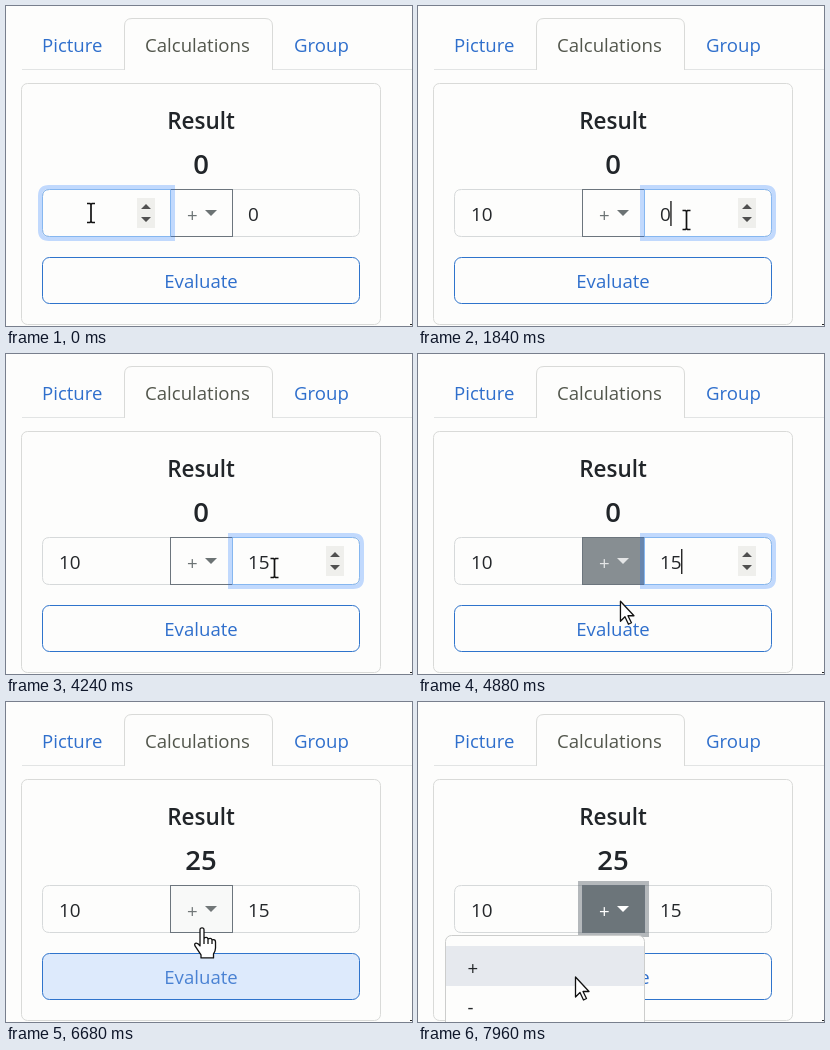
Write an HTML page that moves like this. It is 406 px wide and 320 px high and loops after 8 s.

```html
<!DOCTYPE html>
<html lang="en">
<head>
<meta charset="utf-8">
<title>Calculations form</title>
<style>
html, body { margin: 0; width: 100%; height: 100%; overflow: hidden; background: #fdfdfc; }
svg { display: block; width: 406px; height: 320px; }
text { font: 18.6px "Open Sans", "Noto Sans", sans-serif; fill: #24272a; }
.link { fill: #2f6fcc; }
.head { font-size: 22.5px; font-weight: 600; fill: #212529; text-anchor: middle; }
.sum { font-size: 27.5px; }
.num { font-size: 18.9px; }
.mid { text-anchor: middle; }
.line { fill: none; stroke: #d9dad8; }
.field { fill: #fdfdfc; stroke: #d6d9da; }
.ring { fill: none; stroke: #0d6efd; stroke-opacity: .25; stroke-width: 4; }
.edge { fill: none; stroke: #86b7f0; }
.caret { fill: #111; }
.cursor { stroke: #111; stroke-width: 1.3; fill: #fff; stroke-linejoin: round; }
</style>
</head>
<body>
<svg viewBox="0 0 406 320">
  <path class="line" d="M16 63.5H118M267 63.5H406" style="stroke:#e2e4e4"/>
  <path class="line" d="M118.5 64V20Q118.5 12.5 126 12.5H259Q266.5 12.5 266.5 20V64"/>
  <text class="link" x="36" y="46">Picture</text>
  <text x="139" y="46" style="fill:#52564c">Calculations</text>
  <text class="link" x="288" y="46">Group</text>
  <rect class="line" x="15.5" y="77.5" width="359" height="241" rx="6"/>
  <path d="M404 318.5h2" stroke="#222"/>
  <text class="head" x="195" y="123">Result</text>
  <text class="head sum" id="sum" x="195" y="168"></text>

  <path class="field" id="boxA"/>
  <path class="field" id="boxB"/>
  <rect id="op" x="164.5" y="183.5" width="62" height="47" stroke="#6c757d"/>
  <text id="plus" x="181" y="216">+</text>
  <path id="tri" d="M199 204h12l-6 6z"/>
  <g id="focusA"><path class="ring" id="ringA"/><path class="edge" id="edgeA"/></g>
  <g id="focusB"><path class="ring" id="ringB"/><path class="edge" id="edgeB"/></g>
  <text class="num" id="textA" x="53" y="215"></text>
  <text class="num" id="textB" x="242" y="215"></text>
  <rect class="caret" id="caretA" y="195" width="1.3" height="25"/>
  <rect class="caret" id="caretB" y="195" width="1.3" height="25"/>
  <g id="spinA" transform="translate(131 192)"></g>
  <g id="spinB" transform="translate(320 192)"></g>

  <rect id="go" x="36.5" y="251.5" width="317" height="46" rx="7" stroke="#2f74cc"/>
  <text class="mid" id="goText" x="195" y="282">Evaluate</text>

  <rect id="opRing" x="162" y="181" width="67" height="52" fill="none" stroke="#6c757d" stroke-opacity=".5" stroke-width="4"/>
  <g id="menu">
    <rect x="27.5" y="233.5" width="199" height="120" rx="6" fill="#fdfdfc" stroke="#cccdcc"/>
    <rect id="item" x="28" y="244" width="198" height="40" fill="#e6e9ee"/>
    <text x="49.5" y="273">+</text>
    <text x="49.5" y="312">-</text>
  </g>

  <g id="cursor">
    <path id="beam" d="M-4-9.5H-1L0-8.5 1-9.5H4M0-9V9M-4 9.5H-1L0 8.5 1 9.5H4" fill="none" stroke="#111" stroke-width="1.7"/>
    <path id="arrow" class="cursor" d="M.5 1V21L5 16.5 8.5 24 11.5 22.5 8 15.5H14Z"/>
    <path id="hand" class="cursor" d="M-2 2Q-2 0 0 0Q2 0 2 2V11Q2 9.5 4 9.5Q6 9.5 6 11.5Q6 10.5 8 10.5Q10 10.5 10 12.5Q10 11.7 11.5 11.8Q13.5 12 13.5 14V20Q13.5 23 11.5 26V30H-1V27Q-3 24-7 18Q-8 15.5-6 15.2Q-4 15-2 18ZM2 11v5M6 12v4M10 13v3"/>
  </g>
</svg>
<script>
const LOOP = 8000, BLINK = 530, FADE = 150;
const ui = {};
document.querySelectorAll('[id]').forEach(el => ui[el.id] = el);

// Box with separate corner radii on its left and right side
function box(x, y, w, h, l, r) {
  return `M${x + l} ${y}h${w - l - r}q${r} 0 ${r} ${r}v${h - 2 * r}q0 ${r} ${-r} ${r}` +
    `h${l + r - w}q${-l} 0 ${-l} ${-l}v${2 * l - h}q0 ${-l} ${l} ${-l}z`;
}
function setField(k, x, w, l, r) {
  const d = box(x, 183.5, w, 47, l, r);
  ui['box' + k].setAttribute('d', d);
  ui['edge' + k].setAttribute('d', d);
  ui['ring' + k].setAttribute('d', box(x - 2.5, 181, w + 5, 52, l && l + 2, r && r + 2));
  ui['spin' + k].innerHTML =
    '<rect width="18" height="30" fill="#efefec"/><path d="M4 11l5-5 5 5zM4 19l5 5 5-5z" fill="#505050"/>';
}
setField('A', 36.5, 128, 7, 0);
setField('B', 226.5, 127, 0, 7);

// Pointer: time, x, y
const path = [
  [0, 85, 207], [640, 85, 207], [800, 108, 208], [920, 160, 211], [1000, 202, 215],
  [1080, 236, 219], [1200, 258, 217], [1360, 268.5, 214],
  [4560, 268.5, 214], [4640, 244, 214], [4680, 227, 216], [4760, 214, 220], [4840, 205, 232],
  [4880, 202, 246], [4920, 200, 256], [5040, 195, 266], [5200, 193.5, 266.5],
  [6480, 193.5, 266.5], [6560, 194.5, 250], [6640, 195.5, 234], [6680, 196, 226], [6800, 197, 214],
  [6960, 197, 209], [7780, 197, 209], [7840, 192, 226], [7880, 178, 250], [7920, 164, 268],
  [7960, 157, 274], [8000, 157, 274]
];
// Typed or computed text: time, value
const typedA = [[0, ''], [80, '1'], [240, '10']];
const typedB = [[0, '0'], [2600, ''], [3080, '1'], [3580, '15']];
const sums = [[0, '0'], [5800, '25']];

const last = (steps, t) => steps.filter(s => s[0] <= t).pop();

function pointAt(t) {
  const i = Math.max(1, path.findIndex(p => p[0] > t));
  const [a, b] = [path[i - 1], path[i]];
  const k = (t - a[0]) / (b[0] - a[0]);
  return [a[1] + (b[1] - a[1]) * k, a[2] + (b[2] - a[2]) * k];
}
function ease(t, start) {
  const k = Math.min(1, Math.max(0, (t - start) / FADE));
  return k * k * (3 - 2 * k);
}
const pulse = (t, on, off) => ease(t, on) - ease(t, off);
function mix(a, b, k) {
  return `rgb(${a.map((v, i) => Math.round(v + (b[i] - v) * k))})`;
}
const show = (el, on) => el.style.display = on ? '' : 'none';

const PAPER = [253, 253, 252], GREY = [108, 117, 122], INK = [108, 115, 116];
const BLUE = [11, 109, 250], LINK = [47, 111, 204], WHITE = [255, 255, 255];

function setText(k, steps, t, x, from, to) {
  const [start, value] = last(steps, t);
  ui['text' + k].textContent = value;
  const begin = Math.max(from, start);
  const on = t >= from && t < to && Math.floor((t - begin) / BLINK) % 2 === 0;
  show(ui['caret' + k], on);
  ui['caret' + k].setAttribute('x', x + value.length * 10.8 - 0.5);
}

function draw(t) {
  const [x, y] = pointAt(t);
  const menu = t >= 7360;
  const inRow = y >= 183 && y < 231;
  const overOp = inRow && x >= 165 && x < 227;
  const overGo = y >= 251 && y < 298 && !menu;
  // The hand lingers between the two buttons
  const between = t > 6480 && !menu;
  const kind = overOp || overGo || between ? 'hand' : inRow ? 'beam' : 'arrow';
  for (const name of ['hand', 'beam', 'arrow']) show(ui[name], name === kind);
  ui.cursor.setAttribute('transform', `translate(${x} ${y})`);

  setText('A', typedA, t, 53, 80, 1520);
  setText('B', typedB, t, 242, 1520, 5640);
  ui.sum.textContent = last(sums, t)[1];

  ui.focusA.style.opacity = 1 - ease(t, 1520);
  ui.focusB.style.opacity = pulse(t, 1520, 5690);
  show(ui.spinA, t < 1520);
  show(ui.spinB, t >= 1100 && t < 5640);

  const op = pulse(t, 925, 1035) + pulse(t, 4680, 4840) + ease(t, 6665);
  ui.op.setAttribute('fill', mix(PAPER, GREY, op));
  const ink = mix(INK, WHITE, op);
  ui.plus.style.fill = ink;
  ui.tri.setAttribute('fill', ink);
  ui.opRing.style.opacity = ease(t, 7240);

  const go = pulse(t, 4900, 6565);
  ui.go.setAttribute('fill', mix(PAPER, BLUE, go));
  ui.goText.style.fill = mix(LINK, WHITE, go);

  show(ui.menu, menu);
  show(ui.item, y >= 244);
}

const began = performance.now();
function tick() {
  draw((performance.now() - began) % LOOP);
  requestAnimationFrame(tick);
}
tick();
</script>
</body>
</html>
```
